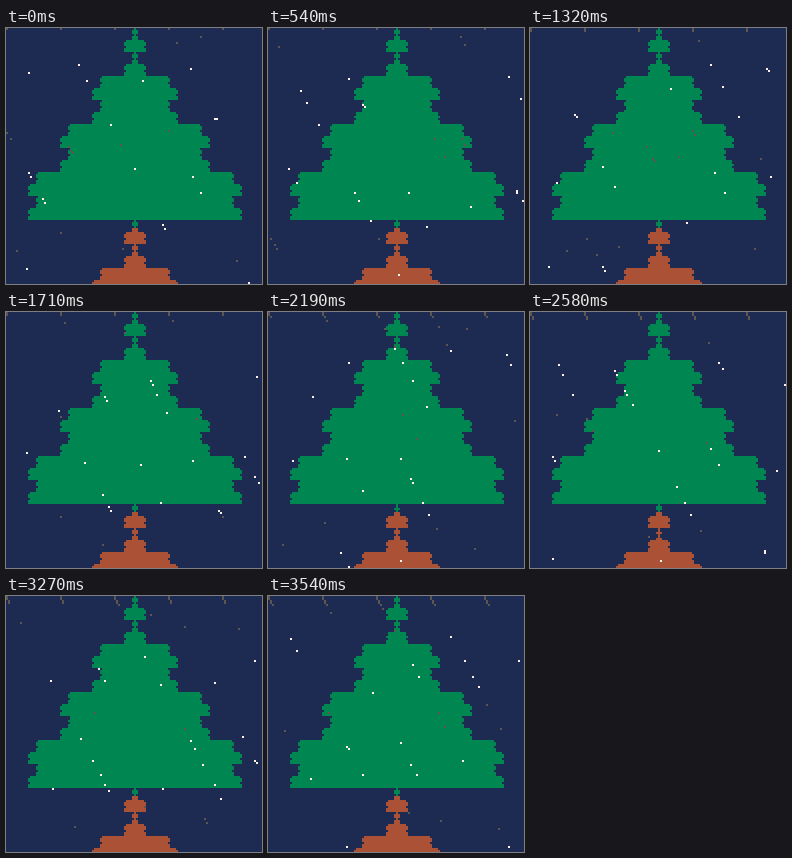
An HTML page with a canvas that plays this animation: 256x256 px, repeating every 3570 ms.

```html
<!DOCTYPE html>
<html>
<head>
<meta charset="utf-8">
<style>
  html, body { margin: 0; height: 100%; overflow: hidden; background: #1d2b53; }
  canvas { display: block; width: 256px; height: 256px; image-rendering: pixelated; }
</style>
</head>
<body>
<canvas width="128" height="128"></canvas>
<script>
const ctx = document.querySelector('canvas').getContext('2d');
const SKY = '#1d2b53', GREEN = '#008751', BROWN = '#ab5236', GREY = '#5f574f', WHITE = '#fff1e8';
const STEP = 30, LOOP = 3570;
const DX = 27, DY = 51; // snow lies on diagonals through this lattice

function seeded(seed) {
  let s = Math.imul(seed + 1, 0x9e3779b1);
  return max => {
    s = (s + 0x6d2b79f5) | 0;
    let h = Math.imul(s ^ (s >>> 15), s | 1);
    h ^= h + Math.imul(h ^ (h >>> 7), h | 61);
    return ((h ^ (h >>> 14)) >>> 0) / 4294967296 * max;
  };
}

function rect(x, y, w, color) {
  ctx.fillStyle = color;
  ctx.fillRect(Math.floor(x), Math.floor(y), w, 1);
}

// Random scanlines: a bit mask of the height gives the branch width.
function drawTree(rnd) {
  for (let i = 0; i < 870; i++) {
    const z = rnd(128 / 1.5), y = z * 1.5, half = z & 53;
    rect(64 - half, y, 2 * half + 1, y < 100 ? GREEN : BROWN);
  }
}

function drawSnow(rnd) {
  for (let i = 0; i < 35; i++) {
    const y = 4 + rnd(124), phase = y / DY % 1, white = phase > 0.34;
    const shift = !white && rnd(1) < 0.25 ? 0.5 : 0;
    const x = ((phase + shift) % 1 + Math.floor(rnd(5))) * DX;
    rect(x, y, 1, white ? WHITE : GREY);
  }
}

function drawStreaks(time) {
  const rows = 1 + Math.floor(time / 860);
  for (let y = 0; y < rows; y++)
    for (let k = 0; k < 5; k++) rect(k * DX + y * DX / DY, y, 1, GREY);
}

function draw(step) {
  const rnd = seeded(step);
  ctx.fillStyle = SKY;
  ctx.fillRect(0, 0, 128, 128);
  drawTree(rnd);
  drawSnow(rnd);
  drawStreaks(step * STEP);
}

const start = performance.now();
function tick() {
  draw(Math.floor((performance.now() - start) % LOOP / STEP));
  requestAnimationFrame(tick);
}
tick();
</script>
</body>
</html>
```
